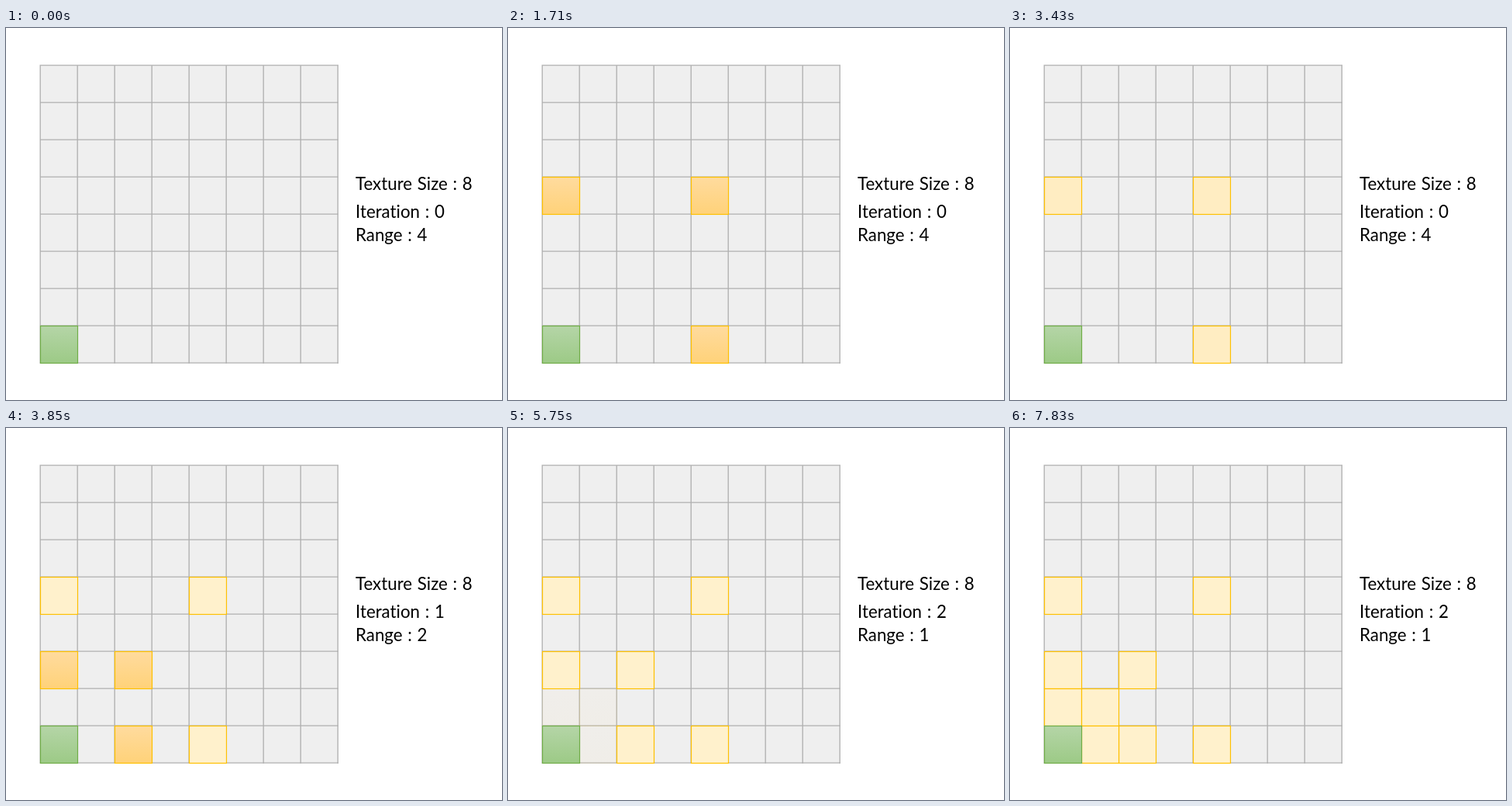
These frames come from a looping animation (640 px wide and 480 px high, 8760 ms). An HTML page with a canvas:

```html
<!DOCTYPE html>
<html lang="en">
<head>
<meta charset="utf-8">
<title>Texture iteration steps</title>
<style>
  html, body { margin: 0; width: 100%; height: 100%; overflow: hidden; background: #fff; }
  canvas { display: block; }
</style>
</head>
<body>
<canvas id="stage" width="640" height="480"></canvas>
<script>
const ctx = document.getElementById('stage').getContext('2d');
const LOOP = 8760, CELL = 48, LEFT = 44, TOP = 48, COUNT = 8;
const FRAME = 60, FADE_FRAMES = 4;

const GREEN = ['#b5d5a7', '#9cca86'];
const ORANGE = ['#ffdb9e', '#ffd279'];
const FLAT = '#ffdb9c', LIGHT = '#ffe6b4', PALER = '#ffedc2', PALE = '#fff1cc';

// Each pass adds three cells; shades are [time since its start, flat fill].
const passes = [
  { start: 1470, range: 4, shades: [[1240, FLAT], [1600, LIGHT], [1960, PALER], [2140, PALE]] },
  { start: 3610, range: 2, shades: [[1240, FLAT], [1600, PALER], [1900, PALE]] },
  { start: 5750, range: 1, shades: [[1240, FLAT], [1600, PALE]] }
];

function drawGrid() {
  const size = CELL * COUNT;
  ctx.fillStyle = '#efefef';
  ctx.fillRect(LEFT, TOP, size, size);
  ctx.strokeStyle = '#b0b0b0';
  ctx.lineWidth = 1.33;
  ctx.beginPath();
  for (let i = 0; i <= COUNT; i++) {
    const x = LEFT + i * CELL + 0.2, y = TOP + i * CELL + 0.2;
    ctx.moveTo(x, TOP - 0.5);
    ctx.lineTo(x, TOP + size + 1);
    ctx.moveTo(LEFT - 0.5, y);
    ctx.lineTo(LEFT + size + 1, y);
  }
  ctx.stroke();
}

// Columns and rows count from the bottom left; fill is a colour or a gradient pair.
function drawCell(col, row, fill, border) {
  const x = LEFT + col * CELL + 0.5, y = TOP + (COUNT - 1 - row) * CELL + 0.5;
  if (Array.isArray(fill)) {
    const gradient = ctx.createLinearGradient(0, y, 0, y + CELL);
    fill.forEach((color, i) => gradient.addColorStop(i, color));
    fill = gradient;
  }
  ctx.fillStyle = fill;
  ctx.strokeStyle = border;
  ctx.lineWidth = 1.2;
  ctx.fillRect(x, y, CELL, CELL);
  ctx.strokeRect(x, y, CELL, CELL);
}

function drawPass({ start, range, shades }, time) {
  const age = time - start;
  if (age < 0) return;
  const fill = shades.reduce((now, [at, color]) => age >= at ? color : now, ORANGE);
  ctx.globalAlpha = Math.min(1, (Math.floor(age / FRAME) + 0.25) / (FADE_FRAMES + 0.25));
  for (const [col, row] of [[0, range], [range, range], [range, 0]]) {
    drawCell(col, row, fill, '#ffc000');
  }
  ctx.globalAlpha = 1;
}

function drawLabels(iteration) {
  ctx.fillStyle = '#000';
  ctx.font = '22.3px Lato, sans-serif';
  ctx.wordSpacing = '1px';
  ctx.letterSpacing = '0.01px'; // any letter spacing turns the "ti" ligature off
  ctx.fillText('Texture Size : 8', 451, 209);
  ctx.fillText('Iteration : ' + iteration, 451, 245);
  ctx.fillText('Range : ' + passes[iteration].range, 451, 275);
}

function draw(time) {
  ctx.fillStyle = '#fff';
  ctx.fillRect(0, 0, 640, 480);
  drawGrid();
  passes.forEach(pass => drawPass(pass, time));
  drawCell(0, 0, GREEN, '#70ad47');
  drawLabels(Math.max(0, passes.filter(pass => time >= pass.start).length - 1));
}

const begin = performance.now();
function tick() {
  draw((performance.now() - begin) % LOOP);
  requestAnimationFrame(tick);
}
tick();
</script>
</body>
</html>
```
